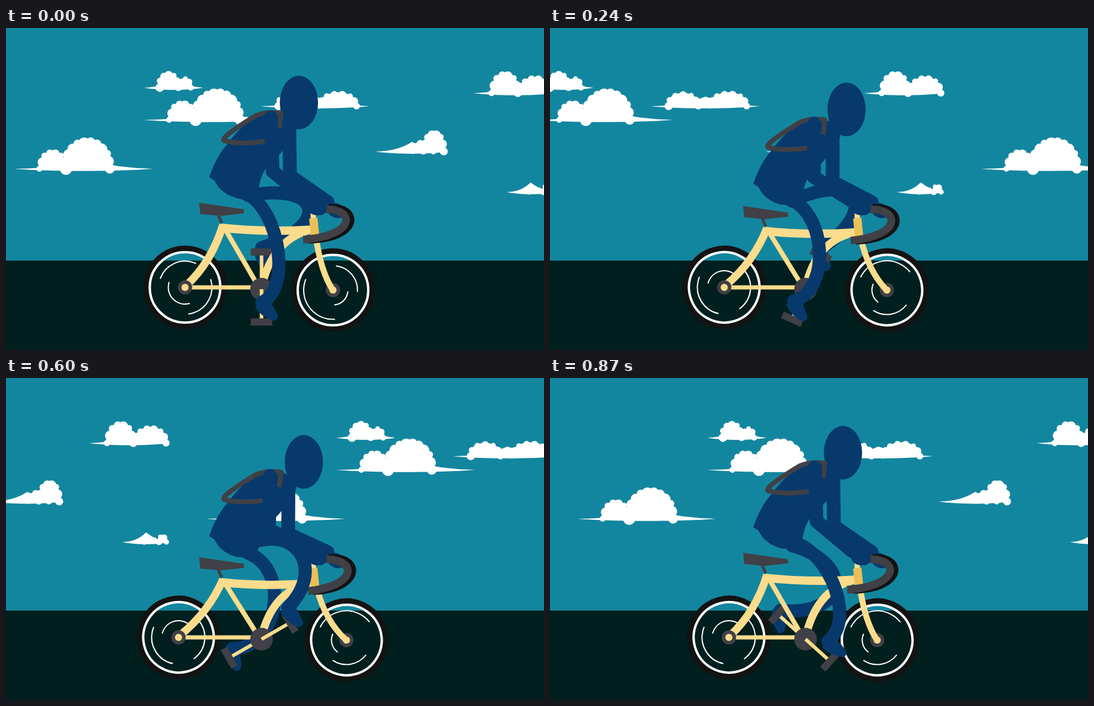
Animation, 900 px wide and 540 px high, one loop 900 ms. Source, as an HTML page with a canvas:

```html
<!DOCTYPE html>
<html lang="en">
<head>
<meta charset="utf-8">
<title>Cyclist</title>
<style>
html, body { margin: 0; height: 100%; overflow: hidden; }
canvas { display: block; }
</style>
</head>
<body>
<canvas id="stage" width="900" height="540"></canvas>
<script>
const ctx = document.getElementById('stage').getContext('2d');
const LOOP = 900, STEP = 30, TILE = 965;
const SKY = '#13869f', GROUND = '#001f1e', RIDER = '#07396c';
const FRAME = '#fbdc8c', GREY = '#404046', BLACK = '#131313', WHITE = '#fff';
const RAD = Math.PI / 180;

function fill(path, color) {
  ctx.fillStyle = color;
  ctx.fill(new Path2D(path));
}
function line(path, color, width, cap = 'butt') {
  ctx.strokeStyle = color;
  ctx.lineWidth = width;
  ctx.lineCap = cap;
  ctx.lineJoin = 'round';
  ctx.stroke(new Path2D(path));
}
function oval(x, y, rx, ry, color, angle = 0) {
  ctx.fillStyle = color;
  ctx.beginPath();
  ctx.ellipse(x, y, rx, ry, angle, 0, 7);
  ctx.fill();
}
function arc(r, from, to, color, width) {
  ctx.strokeStyle = color;
  ctx.lineWidth = width;
  ctx.lineCap = 'round';
  ctx.beginPath();
  ctx.arc(0, 0, r, from * RAD, to * RAD);
  ctx.stroke();
}
function at(x, y, angle, draw) {
  ctx.save();
  ctx.translate(x, y);
  ctx.rotate(angle);
  draw();
  ctx.restore();
}

// Half an ellipse with small puffs along its edge.
function dome(cx, base, rx, h) {
  const puff = 3 + h / 10, count = Math.round((rx + h) / 9);
  ctx.beginPath();
  ctx.ellipse(cx, base, rx - puff / 2, h - puff / 2, 0, Math.PI, 0);
  ctx.fill();
  for (let i = 0; i <= count; i++) {
    const a = Math.PI * i / count, r = puff * (1 + .25 * Math.sin(i * 2.4));
    oval(cx + (rx - r) * Math.cos(a), base - (h - r) * Math.sin(a), r, r, WHITE);
  }
}
// Two domes on a thin base with pointed ends.
function cloud(x, y, w, ...domes) {
  fill(`M${x} ${y}Q${x + w * .3} ${y} ${x + w * .5} ${y - 16}Q${x + w * .75} ${y - 1} ${x + w} ${y}` +
    `C${x + w * .75} ${y + 5} ${x + w * .25} ${y + 5} ${x} ${y}Z`, WHITE);
  for (const [cx, rx, h] of domes) dome(x + cx, y, rx, h);
}
function clouds() {
  for (const [x, y] of [[14, 236], [231, 154]]) cloud(x, y, 231, [64, 27, 33], [122, 46, 53]);
  cloud(231, 100, 99, [41, 22, 28], [69, 14, 19]);
  cloud(426, 131, 182, [54, 31, 25], [130, 36, 26]);
  cloud(782, 109, 135, [53, 28, 37], [103, 32, 30]);
  cloud(618, 207, 122, [80, 22, 20], [98, 23, 36]);
  cloud(838, 275, 79, [48, 16, 8], [67, 11, 14]);
}

function scenery(t) {
  ctx.fillStyle = SKY;
  ctx.fillRect(0, 0, 900, 390);
  ctx.fillStyle = GROUND;
  ctx.fillRect(0, 390, 900, 150);
  for (const offset of [0, TILE]) at(offset - TILE * t / LOOP, 0, 0, clouds);
}

function wheel(x, y, angle, streaks) {
  at(x, y, angle, () => {
    arc(65, 0, 360, BLACK, 10);
    arc(59, 0, 360, WHITE, 4);
    for (const [r, from, to] of streaks) arc(r, from, to, WHITE, 2);
  });
}
function hub(x, y) {
  oval(x, y, 12, 12, GREY);
  oval(x, y, 6, 6, FRAME);
}

// Crank angles are measured clockwise from straight down.
function crank(angle, length) {
  at(427.5, 438, angle * RAD, () => {
    line(`M0 0V${length - 4}`, FRAME, 6);
    fill(`M-18 ${length - 6}h36v12h-36Z`, GREY);
  });
}

// The leg bows forward more the closer the ankle is to the hip.
function leg(hx, hy, angle, length, drop) {
  const a = angle * RAD;
  const ax = 428 - (length - 5) * Math.sin(a);
  const ay = 413 + length * Math.cos(a) - 9 * Math.cos(a + 30 * RAD) + drop;
  const dx = ax - hx, dy = ay - hy, dist = Math.hypot(dx, dy);
  const bend = 182 / dist - .65;
  const control = along => `${hx + bend * dy + along * dx} ${hy - bend * dx + along * dy}`;
  line(`M${hx} ${hy}C${control(.1)} ${control(.92)} ${ax} ${ay}`, RIDER, 22, 'round');
  const foot = (65 + 25 * Math.cos((angle - 125) * RAD)) * RAD;
  at(ax, ay, foot, () => fill('M-5 -10Q10 -13 34 -7Q40 -3 37 4Q20 16 0 14Q-10 4 -5 -10Z', RIDER));
}

function arm(sx, sy, ex, ey, wx, wy) {
  line(`M${sx} ${sy}L${ex} ${ey}L${wx} ${wy}`, RIDER, 23, 'round');
}

function bike(e, rearX, frontX) {
  const s = 10 * e, h = 8 * e;
  line(`M${rearX} 435H427`, FRAME, 7);
  line(`M367 ${338 + s}L419 428`, FRAME, 8);
  line(`M363 ${330 + s}Q${344 - 6 * e} 392 ${rearX + 3} 431`, FRAME, 13);
  line(`M512 ${338 + h}Q450 ${352 + h / 2} 430 425`, FRAME, 13);
  line(`M360 ${335 + s}Q435 ${343 + s} 515 ${338 + h}`, FRAME, 14);
  hub(rearX, 435);
  hub(frontX, 439.5);
  line(`M${518 + 3 * e} ${347 + h}Q${526 + 11 * e} 408 ${frontX} 440`, FRAME, 10);
  line('M514 303V322', FRAME, 9);
  line(`M514 319L517 ${348 + 2 * e}`, '#ecc058', 14);
  at(0, s, 0, () => {
    line('M354 312L361 327', GREY, 5);
    fill('M323 293L398 304V311L360 315L325 312Z', GREY);
  });
  const bx = 11 * e, by = 3 * e, front = 4 * e;
  line(`M540 302C${593 + front} 298 ${593 + front} 354 ${506 + bx} ${355 + by}`, BLACK, 13);
  line(`M535 304C${583 + front} 303 ${588 + front} 348 ${497 + bx} ${355 + by}`, GREY, 13);
}

function draw(t) {
  const e = (1 - Math.cos(2 * Math.PI * t / LOOP)) / 2;
  const pedal = 1.6 * t, spin = t / STEP * 240 * RAD;
  const rearX = 299.5 - 14.5 * e, frontX = 547 + 30 * e;

  scenery(t);
  wheel(rearX, 435, spin, [[44, 200, 294], [45, -17, 82], [28, 75, 197]]);
  wheel(frontX, 439.5, spin, [[41, -82, 3], [25, 7, 83], [49, 87, 201]]);

  // Far side of the rider
  leg(405, 281 + 17 * e, pedal + 180, 62.5, 10);
  arm(474 - 2 * e, 172 + 17 * e, 475 - 4 * e, 248 + 18 * e, 538, 292);
  oval(552, 306, 16, 12, RIDER, .5);
  crank(pedal + 180, 62.5);

  bike(e, rearX, frontX);
  oval(427.5, 438, 19, 19, GREY);
  crank(pedal, 55);

  // Near side of the rider
  leg(390, 275 + 17 * e, pedal, 55, 0);
  oval(490 + 11 * e, 125 + 21 * e, 32, 45, RIDER);
  at(0, 20 * e, 0, () => {
    fill('M340 250Q352 215 370 195Q395 160 430 140Q447 134 470 147L488 158L485 172' +
      'Q466 208 436 233Q424 250 421 279Q400 289 382 284Q358 276 349 256Z', RIDER);
    line('M433 190Q395 196 365 189Q357 184 418 147Q436 139 460 143L457 168', GREY, 8);
  });
  arm(443 - 2 * e, 150 + 19 * e, 446 - 8 * e, 240 + 18 * e, 505, 290);
  oval(520, 302, 17, 12, RIDER, .2);
}

function tick() {
  draw(Math.floor(performance.now() / STEP) * STEP % LOOP);
  requestAnimationFrame(tick);
}
tick();
</script>
</body>
</html>
```
